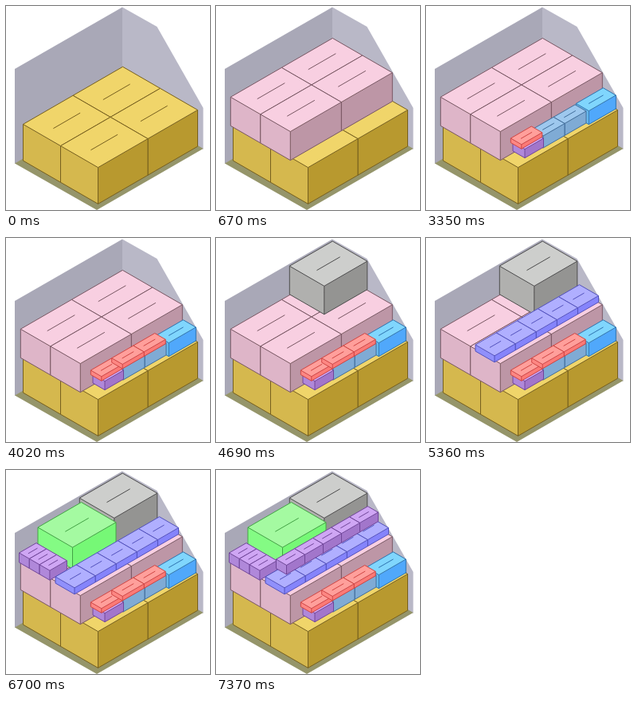
Animation of 256 by 256 pixels, one loop 8 s. Source, as an HTML page with a canvas:

```html
<!DOCTYPE html>
<html lang="en">
<head>
<meta charset="utf-8">
<title>Container loading</title>
<style>
html, body { margin: 0; width: 100%; height: 100%; overflow: hidden; background: #fff; }
canvas { display: block; width: 256px; height: 256px; }
</style>
</head>
<body>
<canvas id="stage" width="256" height="256"></canvas>
<script>
const ctx = document.getElementById('stage').getContext('2d');
const LOOP = 8000;
const STEP = 670;
const SLOPE = Math.tan(Math.PI / 6);

// Colours: top, left, right, edges
const colors = {
  yellow: ['#f0d56a', '#d5b84e', '#b8992f', '#77601f'],
  pink: ['#f8cfe1', '#deb5c8', '#bd96a6', '#785763'],
  cyan: ['#80d6fd', '#6abcf0', '#50a8fb', '#2f74b0'],
  blue: ['#9ec8ee', '#86afd7', '#7fabd5', '#416d9a'],
  purple: ['#cfa6f4', '#b088da', '#a276cb', '#704699'],
  red: ['#ff9f9b', '#fd8783', '#fb7a76', '#cf4644'],
  gray: ['#cdcecc', '#b0b0ae', '#949492', '#4c4c4c'],
  violet: ['#b0afff', '#9090fb', '#8584fb', '#5352bd'],
  green: ['#a4faa1', '#84fb84', '#76f876', '#43a345']
};

// Stacks in painting order. x, y: left corner of the top; a, b: box widths
// to the upper right and lower right; na, nb: box counts; step: time of arrival.
const stacks = [
  { step: 0, color: 'yellow', x: 21.5, y: 148.4, a: 62.5, b: 47, h: 45.7, na: 2, nb: 2 },
  { step: 1, color: 'pink', x: 18.3, y: 114.3, a: 64, b: 37.5, h: 36, na: 2, nb: 2 },
  { step: 7, color: 'gray', x: 92.3, y: 35.2, a: 54, b: 43.5, h: 35.5 },
  { step: 9, color: 'green', x: 40, y: 72, a: 54.5, b: 43.5, h: 27 },
  { step: 10, color: 'purple', x: 16.5, y: 104, a: 21.5, b: 12.8, h: 12, nb: 3 },
  { step: 8, color: 'violet', x: 62, y: 134, a: 26.1, b: 24, h: 8, na: 5 },
  { step: 11, color: 'purple', x: 75.5, y: 112, a: 23, b: 13, h: 11.5, na: 5 },
  { step: 2, color: 'cyan', x: 188.3, y: 122.4, a: 34, b: 16, h: 17 },
  { step: 3, color: 'blue', x: 133, y: 155, a: 27, b: 14, h: 15, na: 2 },
  { step: 4, color: 'purple', x: 109, y: 171, a: 23.5, b: 15, h: 11 },
  { step: 5, color: 'red', x: 106.3, y: 166, a: 26, b: 13.5, h: 5.5 },
  { step: 6, color: 'red', x: 132.7, y: 150.7, a: 27, b: 13.5, h: 5.5, na: 2 }
];

function path(points) {
  ctx.beginPath();
  points.forEach(([x, y]) => ctx.lineTo(x, y));
}

function polygon(points, fill) {
  path(points);
  ctx.closePath();
  ctx.fillStyle = fill;
  ctx.fill();
}

function line(...points) {
  path(points);
  ctx.stroke();
}

function drawBox(x, y, a, b, h, [top, left, right, edge]) {
  const at = (u, v, drop = 0) => [x + u * a + v * b, y + (v * b - u * a) * SLOPE + drop];
  polygon([at(0, 0), at(0, 1), at(0, 1, h), at(0, 0, h)], left);
  polygon([at(0, 1), at(1, 1), at(1, 1, h), at(0, 1, h)], right);
  polygon([at(0, 0), at(1, 0), at(1, 1), at(0, 1)], top);

  ctx.strokeStyle = edge;
  line(at(0, 0), at(1, 0), at(1, 1), at(1, 1, h), at(0, 1, h), at(0, 0, h), at(0, 0));
  line(at(0, 0), at(0, 1), at(1, 1));
  line(at(0, 1), at(0, 1, h));
  line(at(0.23, 0.5), at(0.77, 0.5));
}

function drawStack({ color, x, y, a, b, h, na = 1, nb = 1 }) {
  for (let i = na - 1; i >= 0; i--) {
    for (let j = 0; j < nb; j++) {
      drawBox(x + i * a + j * b, y + (j * b - i * a) * SLOPE, a, b, h, colors[color]);
    }
  }
}

function drawContainer() {
  polygon([[11, 79], [146, 1.5], [146, 120], [11, 198]], '#a9a8b7');
  polygon([[146, 1.5], [189.5, 26], [247.5, 128], [247.5, 180], [146, 121]], '#b9b8c7');
  polygon([[11, 197.5], [146, 120], [247.5, 179], [114, 256]], '#95956a');
}

function draw(now) {
  const step = Math.floor((now % LOOP) / STEP);
  ctx.fillStyle = '#fff';
  ctx.fillRect(0, 0, 256, 256);
  ctx.lineWidth = 1;
  ctx.lineJoin = 'round';
  drawContainer();
  stacks.filter(s => s.step <= step).forEach(drawStack);
}

const start = performance.now();
function tick() {
  draw(performance.now() - start);
  requestAnimationFrame(tick);
}
tick();
</script>
</body>
</html>
```
